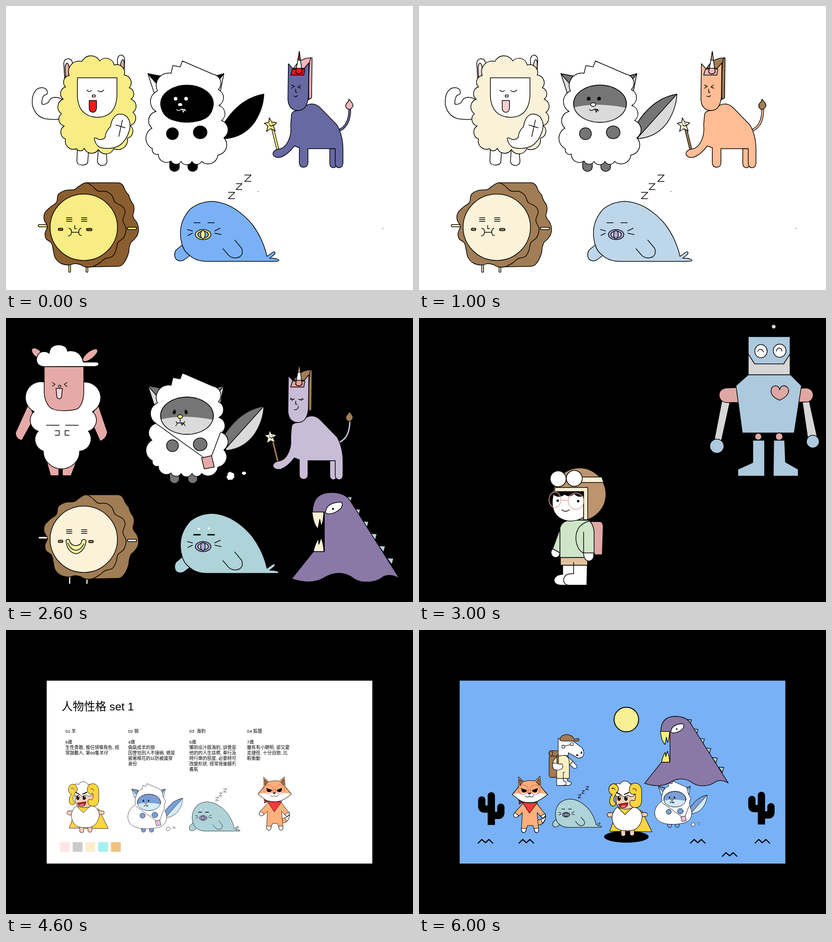
An HTML page that plays this animation: 895 px wide and 625 px high, repeating every 7 s.

```html
<!DOCTYPE html>
<html lang="zh-Hant">
<head>
<meta charset="utf-8">
<title>Character sheet</title>
<style>
html, body { margin: 0; width: 100%; height: 100%; overflow: hidden; background: #000; }
svg { display: block; width: 895px; height: 625px; }
.scene {
  stroke: #000; stroke-width: 1.5; stroke-linejoin: round; stroke-linecap: round;
  visibility: hidden;
  animation: show 7s step-end infinite;
  animation-delay: calc((var(--i) - 7) * 1s);
}
@keyframes show {
  0% { visibility: visible; }
  14.2857%, 100% { visibility: hidden; }
}
text {
  font-family: "Liberation Sans", Arial, "Noto Sans CJK TC", "Noto Sans CJK", sans-serif;
  font-size: 9.8px; stroke: none; fill: #000; white-space: pre;
}
</style>
</head>
<body>
<svg id="stage" viewBox="0 0 895 625"></svg>
<script>
const P = (d, fill = 'none', extra = '') => `<path d="${d}" fill="${fill}" ${extra}/>`;
const E = (x, y, rx, ry, fill = 'none', extra = '') =>
  `<ellipse cx="${x}" cy="${y}" rx="${rx}" ry="${ry}" fill="${fill}" ${extra}/>`;
const R = (x, y, w, h, fill, r = 0, extra = '') =>
  `<rect x="${x}" y="${y}" width="${w}" height="${h}" rx="${r}" fill="${fill}" ${extra}/>`;
const G = (body, extra) => `<g ${extra}>${body}</g>`;
const place = (body, x, y, s) => G(body, `transform="translate(${x} ${y}) scale(${s})"`);
const NS = 'stroke="none"';
const points = s => s.split(' ').map(p => p.split(',').map(Number));

// Scalloped outline: one arc between each pair of cusps.
const puff = s => points(s).map(([x, y], i, a) => {
  if (!i) return `M${x} ${y}`;
  const r = Math.hypot(x - a[i - 1][0], y - a[i - 1][1]) * .56;
  return `A${r} ${r} 0 0 1 ${x} ${y}`;
}).join('');

// Closed smooth curve through the points.
const smooth = s => {
  const a = points(s), n = a.length, at = i => a[(i + n) % n];
  return `M${a[0]}` + a.map((p, i) => {
    const o = at(i - 1), q = at(i + 1), r = at(i + 2);
    const c = k => [p[k] + (q[k] - o[k]) / 6, q[k] - (r[k] - p[k]) / 6];
    const [x1, x2] = c(0), [y1, y2] = c(1);
    return `C${x1} ${y1} ${x2} ${y2} ${q}`;
  }).join('') + 'z';
};

// Line with a black edge on both sides.
const tube = (d, fill, w) =>
  P(d, 'none', `stroke-width="${w}"`) +
  P(d, 'none', `stroke="${fill}" stroke-width="${w - 2.6}"`);

const alpaca = c =>
  P('M129 160L127 126Q128 116 137 116Q147 117 146 130L140 162', '#fff') +
  P('M131 162L130 134Q131 125 135 126Q139 128 139 140L137 162z', c.ear) +
  P('M246 140L245 118Q246 108 254 108Q261 110 261 120L259 154', '#fff') +
  P('M254 150L252 128Q254 118 257 118Q260 119 260 128L259 152z', c.ear) +
  P('M120 249Q102 251 85 248Q64 242 58 218Q56 196 66 185Q72 179 82 180Q91 182 91 190Q91 196 84 196Q78 203 79 216Q87 218 94 211Q96 203 106 201Q117 201 125 206', '#fff') +
  P('M157 310L156 342Q157 350 168 350Q180 350 180 341L182 312', '#fff') +
  P('M203 315L201 342Q203 351 212 351Q222 350 222 342L220 315', '#fff') +
  P(puff('139,153 167,122 206,121 238,130 260,152 271,180 275,205 279,234 273,263 267,291 237,314 203,316 172,313 155,314 131,293 128,264 122,237 126,205 131,178 139,153'), c.wool) +
  P('M157 158H244V198Q241 245 200 245Q160 243 157 200z', '#fff') +
  P('M178 185Q182 191 188 186M202 186Q208 192 215 185') +
  E(193, 198, 3.5, 2.5, '#fff') +
  P('M183 208H199V225Q198 234 191 234Q183 233 183 225z', c.tongue) +
  P('M194 291Q197 289 203 293Q212 296 218 289Q219 276 230 265Q232 247 244 239Q258 235 267 245Q277 258 270 278Q262 300 246 309Q225 317 206 311Q196 305 194 291z', '#fff') +
  P('M256 251L248 287M242 262L262 268');

const fluffy = puff('455,150 467,184 468,219 474,252 479,290 466,328 430,342 409,342 385,342 363,341 335,326 322,314 321,269 330,232 333,187 363,148') + 'L367 131 383 134 388 121z';
const round = 'M363 148L367 131 383 134 388 121 455 150Q468 165 466 182L482 212Q468 230 478 256Q492 285 482 312Q470 336 440 341Q390 352 345 343Q292 330 292 285Q296 245 332 225Q325 215 332 190Q338 158 363 148z';

const wolf = c =>
  P('M312 149L326 192 345 180 344 155z', c.ear) + P('M312 149L344 155 338 179z', c.dark) +
  P('M479 149L471 190 455 178 459 155z', c.ear) + P('M479 149L457 155 461 172z', c.dark) +
  P('M470 275Q506 205 567 194Q566 225 547 255Q522 290 479 292z', c.light) +
  P('M470 275Q506 205 567 194L479 292z', c.dark) +
  (c.torn ? P(smooth('478,256 487,263 485,272 489,281 483,286 484,294 472,294 472,262'), '#000') : '') +
  [360, 400].map(x => P(`M${x} 335V354a10.5 10 0 0 0 21 0V335z`, c.dark)).join('') +
  P(c.body || fluffy, '#fff') +
  E(398, 215, 58, 41, c.dark) +
  P('M341 223Q392 211 455 224Q450 256 398 256Q346 256 341 223z', c.light, NS) +
  (c.light == c.dark ? '' : E(398, 215, 58, 41)) +
  (c.sad
    ? P('M371 202Q364 209 370 211Q375 210 371 202zM395 202Q402 209 397 211Q391 210 395 202z', '#000') +
      P('M383 221V229M374 228Q379 233 373 237M376 231H391M393 228Q389 233 394 237M385 231l2 5 3-5') +
      P('M331 233L436 308M472 251L452 304') +
      P('M430 308L452 303 458 328 436 332z', c.pouch) +
      P(puff('487,346 488,341 497,340 502,347 500,353 494,356 486,353 487,346'), '#fff') +
      P(puff('519,339 523,338 528,340 527,344 521,345 519,339'), '#fff')
    : E(373, 204, 4, 4, c.ink, NS) + E(396, 204, 4, 4, c.ink, NS) +
      P('M375 228Q379 232 384 228Q388 225 392 230M387 228l3 6 2-7 3 4', 'none', `stroke="${c.ink}"`)) +
  E(383, 217, 5.5, 4, c.nose || '#fff') +
  E(366, 281, 13, 13, c.dark) + E(427, 278, 15, 14, c.dark);

const unicorn = c =>
  tube('M732 274Q756 264 756 227', c.body, 5.6) +
  P('M754 205Q766 217 762 222Q758 229 752 227Q744 222 749 214Q754 210 754 205z', c.mane) +
  tube('M586 268L598 317', c.stick, 6) +
  P('M579 246L584 255 595 257 588 264 592 275 582 270 573 276 576 264 568 258 578 256z', c.star) +
  P('M580 262Q584 267 588 261M579 259v.5M585 258v.5') +
  P('M712 314V346Q712 356 721 356Q728 354 727 346V314z', c.body) +
  P('M628 238Q631 230 642 230Q652 228 660 219Q676 210 691 224L728 262Q741 285 741 316V346Q740 356 732 356Q724 355 724 346V314H664V346Q663 355 654 355Q645 354 645 345V312L634 308Q620 327 604 333Q590 335 587 326Q587 318 598 315Q614 314 622 294Q628 280 626 262z', c.body) +
  P('M632 138Q646 113 673 114L672 202 662 208z', c.mane) + P('M670 115Q665 122 666 205') +
  P('M621 127L630 137H656L666 125 665 200Q662 230 642 230Q621 229 620 205z', c.body) +
  P('M630 139H657L655 152H626z', c.horn) +
  P('M645 100L637 146Q644 153 651 146z', '#fff') +
  P('M645 100L642 119H647.5zM638.5 137H650L651 146Q644 153 637 146z', c.horn) +
  P('M637 183V190H640') +
  (c.wink
    ? P('M626 176Q629 181 634 178M643 179Q648 181 652 177M627 179l-2 0M630 180l-1 2M649 180l1 2M652 179l2 0M634 202Q642 203 643 194')
    : P('M628 174L634 177 628 181M648 174L642 178 648 181M633 198Q637 202 641 197'));

const tart = c =>
  R(71, 481, 24, 5, c.limb, 2.5) + R(138, 560, 4, 26, c.limb, 2) + R(176, 566, 4, 20, c.limb, 2) +
  P('M175 389L248 389Q257 391 260 401Q263 409 270 416Q272 427 280 437Q284 447 279 460Q279 467 287 475Q295 491 289 504Q283 514 275 520Q270 530 270 542Q265 560 256 569Q251 573 244 573L188 574z', c.crust) +
  P(smooth('175,389 188,395 202,407 220,408 233,417 240,432 256,441 262,453 257,472 264,490 259,509 246,521 242,537 234,551 218,556 205,566 189,574 174,574 163,569 151,567 138,570 120,566 108,554 104,538 100,522 88,512 86,499 91,485 84,471 85,456 97,443 111,432 115,415 130,406 150,404 160,397'), c.crust) +
  E(171, 487, 74, 73, c.face) +
  P([466, 470, 474].map(y => `M133 ${y}H145M166 ${y}H178`).join('')) +
  R(115, 489, 10, 5, c.crust, 2.5) + R(c.smile ? 182 : 177, 489.5, c.smile ? 10 : 12, 5, c.crust, 2.5) +
  R(267, 487, 20, 5, c.limb, 2.5) +
  (c.smile
    ? P('M132 490Q134 486 139 488Q142 501 154 501Q166 500 167 489Q172 485 176 490Q174 513 155 519Q134 516 132 490z', c.smile) +
      P('M136 495Q142 511 154 511Q166 510 171 497')
    : P('M151 483V490H155M144 498H160M138 489Q145 491 144 498Q144 505 137 506M165 489Q159 492 160 498Q160 505 166 505'));

const zzz = [[489, 410, 14], [506, 391, 13], [525, 372, 14]]
  .map(([x, y, s]) => P(`M${x} ${y}h${s}l-${s} ${s}h${s}`)).join('');
const dot = (x, y) => R(x, y, 1.4, 1.4, '#000', 0, NS);

const seal = c =>
  P('M390 524L374 537Q368 546 373 556Q380 564 391 559L408 546z', c.body) +
  P('M387 524Q375 480 405 447Q425 431 452 430Q500 432 541 480Q565 512 574 551L588 541Q594 541 590 547L580 555Q598 555 600 560Q599 562 594 562L443 562Q418 562 404 549Q391 540 387 524z', c.body) +
  P('M503 515L518 533Q523 545 514 552Q500 558 490 549L477 534') +
  P('M413 477H427M444 477H458', 'none', c.brow ? 'stroke-width="2.8"' : '') +
  (c.brow ? E(424, 464, 2.3, 2.3, '#fff', NS) + E(446, 463, 2.3, 2.3, '#fff', NS) : '') +
  P('M399 492L410 495M400 505L410 500M459 495L471 489M459 500L473 503') +
  E(433.5, 503, 17, 11, c.ring) + E(433.5, 503, 11.5, 7.5, c.inner) + E(433, 503, 5, 9, c.ring);

const sheep = () => {
  const pink = '#e5aaa7';
  return E(68, 77, 14, 8, pink, 'transform="rotate(42 68 77)"') +
    E(185, 82, 20, 8, pink, 'transform="rotate(-38 185 82)"') +
    P('M51 186L21 252Q21 267 35 269L62 220zM201 186L223 251Q221 266 207 271L186 224z', pink) +
    P('M90 318L98 347H116V325zM124 325V347H143L154 318z', pink) +
    P('M171 141A34.6 34.6 0 0 1 190 206A25 25 0 0 1 181 249A27 27 0 0 1 162 293A40 39 0 0 1 82 293A27 27 0 0 1 71 249A25 25 0 0 1 62 206A34.6 34.6 0 0 1 84 141z', '#fff') +
    P('M84 107H171V165Q170 190 157 200Q145 204 128 204Q106 204 97 197Q85 185 84 165z', pink) +
    P('M84 107Q68 106 67 92Q69 74 84 74Q91 74 95 78Q96 60 116 59Q134 60 135 73Q163 68 170 97H199Q204 98 204 102Q203 106 196 106.5z', '#fff') +
    P('M102 142L108 146 102 150M134 142L128 146 134 151') + E(118, 150, 2.5, 2, '#fff') +
    P('M110 155H124L122 175Q117 181 112 175z', '#f3d3d1') +
    P('M89 236H117M131 236H159M108 248H117V258H108M139 248H130V258H139');
};

const monster = tooth => {
  let spikes = '';
  for (let i = 0; i < 6; i++) spikes += `M${746 + 18.3 * i} ${393 + 27 * i}l15 1-4 14z`;
  return P(spikes, '#aed3d8') +
    P('M674 428Q674 384 715 384Q745 384 757 402L865 573Q846 562 830 569Q815 582 788 581Q772 580 760 570Q730 552 697 573Q670 588 628 574L676 514H700V427z', '#8a78a6') +
    P('M673 427H699Q698 450 693 458L690 443 686 464Q677 455 674 435z', tooth) +
    P('M676 514Q680 495 687 486L688 498 693 483Q699 500 699 514z', tooth) +
    P('M703 426Q705 407 735 405Q743 407 737 418Q724 432 707 431Q702 430 703 426z', '#fff') +
    E(719, 420, 2.2, 2.2, '#000', NS);
};

const robot = () => {
  const blue = '#adc9de', gray = '#d6d6d6', pink = '#e0a8a5';
  return E(780, 19, 4, 4, gray, NS) +
    P('M666 182L684 184 665 270H649zM843 184L858 182 876 264 855 266z', gray) +
    P('M702 153L676 154Q660 156 660 170Q661 184 676 186H704zM836 155L852 154Q866 156 867 170Q865 184 852 185H832z', pink) +
    E(655, 282, 15.5, 15.5, blue) + E(866, 272, 14, 14, blue) +
    R(724, 41, 92, 84, blue) +
    P('M724 79L738 101H802L816 79V125H724z', gray) +
    E(752, 73, 13.5, 14.5, '#fff') + E(793, 72, 14, 14.5, '#fff') +
    P('M745 74Q746 68 752 69Q757 70 757 75M786 73Q787 66 792 66Q798 67 798 73') +
    P('M724 125H817L841 149 825 253H711L697 149z', blue) +
    P('M793 181Q774 173 774 160Q775 150 784 149Q792 150 793 158Q795 149 803 149Q813 151 813 161Q811 173 793 181z', pink) +
    E(746, 261, 7.5, 7.5, pink) + E(792, 261, 8, 8, pink) +
    P('M734 269H760V348H701V333L734 318zM780 269H804L806 317 834 333V348H779z', blue);
};

const kid = () => {
  const green = '#cfe5c8', pink = '#e0a8a5', cream = '#f8efd4';
  return P('M376 448H398Q405 449 405 460L403 521H382z', pink) +
    E(353, 388, 58, 58, '#bc946d') +
    P('M316 544H370L369 588H312Q297 587 297 576Q300 565 316 564z', '#fff') +
    P('M311 527H370L371 544H311z', '#e0c19b') +
    P('M340 538V563Q320 561 318 576Q318 586 328 588') +
    P('M310 464L294 508 310 517z', green) +
    P('M294 508L310 517Q309 528 298 527Q288 522 291 512z', '#fff') +
    P('M310 462Q314 447 332 445H372Q385 453 385 475V527H310z', green, NS) +
    R(370.5, 517, 16, 11, '#000', 0, NS) +
    P('M310 517V462Q314 447 332 445H372Q385 453 385 475V517M310 517V527H370') +
    P('M374 447Q345 455 345 485Q346 510 363 518M362 471V517') +
    P('M362 517H384Q386 534 373 535Q362 533 362 517z', '#fff') +
    P('M298 382H362V438Q350 447 331 447Q293 443 293 404Q294 390 298 382z', '#fff') +
    P('M297 389L300 381H361V391Q350 396 341 386Q332 396 320 388Q308 397 297 389z', '#000') +
    P('M299 373H371V444H362V382H298z', cream) +
    P('M356 350H402L406 362H356z', cream) +
    E(306, 354, 17.5, 17.5, '#fff') + E(341.5, 353, 17.5, 17.5, '#fff') +
    G(E(299, 400, 13, 17) + E(345, 403, 17, 18) + P('M312 401H329'), `stroke="${pink}"`) +
    E(305, 402, 2.7, 2.7, '#000', NS) + E(350, 403, 2.7, 2.7, '#000', NS) +
    P('M314 422Q322 429 331 422');
};

const ram = () => {
  const gold = '#ffd53f', skin = '#f9cdb4';
  return P('M152 400L139 436 225 437 204 394z', gold) +
    R(134, 398, 18, 9, skin, 4.5) + R(198, 398, 18, 8, skin, 4) +
    R(162, 425, 9, 21, skin, 4) + R(180, 425, 9, 20, skin, 4) +
    P(smooth('150,391 160,387 186,387 198,391 205,405 201,421 191,432 174,435 157,432 147,422 144,406'), '#fff') +
    P('M157 389H184L170 402z', gold) +
    P('M152 358H193V378Q190 391 172 391Q153 390 152 376z', skin) +
    P(puff('150,362 148,347 160,340 180,340 190,348 190,360 176,362 162,361 150,362'), '#fff') +
    P('M157 352Q156 340 147 339Q137 341 137 352Q138 360 144 361Q138 368 139 378Q142 387 149 384Q153 380 149 376Q146 374 148 366Q153 358 157 352zM143 349Q148 346 150 352', gold) +
    P('M179 350Q180 338 192 338Q204 340 204 355V375Q203 388 190 388Q179 386 180 376Q182 371 188 374Q193 372 191 360Q188 362 183 360Q178 356 179 350zM186 350Q192 347 193 354', gold) +
    P('M153 357L160 361M178 357L169 361', 'none', 'stroke-width="2"') +
    E(158, 369, 3.4, 5, '#000', NS) + E(172, 369, 3.4, 5, '#000', NS) +
    E(159, 366.5, 1.1, 1.5, '#fff', NS) + E(173, 366.5, 1.1, 1.5, '#fff', NS) +
    P('M157 381Q168 379 176 378Q175 389 166 388Q159 387 157 381z', '#c9202b') +
    P('M161 386Q167 381 173 385Q168 389 161 386z', '#f58b8b', NS);
};

const fox = () => {
  const fur = '#ffb07c';
  return P('M605 425Q622 426 624 407Q616 414 605 415z', fur) + P('M617 421Q623 416 624 407Q619 412 614 413z', '#fff') +
    P('M578 378L559 399Q554 406 560 409Q565 410 575 399L573 434Q573 441 578 441Q583 440 583 434L586 426H597L600 434Q600 441 605 441Q610 440 609 434L606 399 615 409Q622 411 624 404L604 378z', fur) +
    P('M559 399Q554 406 560 409Q565 409 567 405zM623 401Q624 409 617 410L613 406zM573 432Q573 441 578 441Q583 440 583 432zM600 432Q600 441 605 441Q610 440 609 432z', '#fff') +
    P('M567 324L578 334Q591 330 601 333L612 323 614 345 628 361 614 371Q603 378 591 378Q575 378 567 371L554 361 567 345z', fur) +
    P('M554 361Q578 356 590 358Q604 356 628 361L614 371Q603 378 591 378Q575 378 567 371z', '#fff', NS) +
    P('M569 329L576 335 570 342zM610 328L604 335 611 342z', '#a5714a') +
    P('M567 371L554 361 567 345M614 345L628 361 614 371Q603 378 591 378Q575 378 567 371') +
    G(E(577, 351, 10.5, 10) + E(602, 351, 10.5, 10) + P('M587 352H592'), 'stroke="#f0504f"') +
    P('M570 347L585 352Q583 357 578 357Q573 356 573 349zM609 347L595 352Q597 357 602 357Q607 355 607 348z', '#000', NS) +
    P('M587 358H593L590 361z', '#000') + P('M581 364Q587 369 590 364Q594 369 599 363') +
    P('M575 377Q591 380 607 377L590 400z', '#fb3a3c') +
    P('M575 377L567 373 569 377 568 381 573 379z', '#b3242c');
};

const horse = c =>
  R(142, 373, 20, 43, c.pack, 4) + R(142, 363, 20, 11, c.pack, 4) + E(145.5, 368.5, 3.5, 5.5, c.pack) +
  P('M157 416H178V423Q186 424 186 428Q185 432 179 432H157z', '#fff') +
  P('M170 418V423Q176 424 176 428Q175 432 170 432') +
  P('M182 390L189 384 197 393Q198 399 191 398z', '#fff') +
  P('M178 374L189 384 182 392z', c.shirt) +
  P('M149 390Q150 373 172 372Q182 374 182 388V418H157V390z', c.shirt) + P('M173 406H170V418') +
  P('M160 338L168 343H188L207 357Q213 366 209 374Q203 380 196 376L180 367V373Q170 371 160 374z', '#fff') +
  E(206, 367, 1.6, 2.4, '#000', NS) + E(197.5, 372, 2.4, 1.6, '#000', NS) +
  P('M173 354L184 351') + E(170, 355, 3, 3, '#fff') + E(187, 350, 3, 3, '#fff') +
  P('M163 342Q165 331 177 331Q189 332 191 340L200 339Q203 342 199 344L168 344z', c.pack) +
  R(157.5, 372, 3, 19, c.pack) +
  P('M149 388H158Q161 391 167 389Q171 393 168 398Q160 404 151 400Q148 395 149 388z', '#fff');

const cactus = x => G(
  P('M151 429V365a8 8 0 0 1 16 0V429z', '#000', NS) +
  P('M138 374V388Q138 394 144 394H159M180 390V402Q180 408 174 408H159', 'none', 'stroke-width="16"'),
  `transform="translate(${x} ${x ? -1 : 0})"`);
const zigzag = (x, y) => P(`M${x} ${y}l8-8 8 7 8-7 8 8`, 'none', 'stroke-width="2.4"');

const column = (x, lines) => lines.split('|').map((t, i) =>
  `<text x="${x}" y="${i ? 238 + 12 * i : 226}">${t}</text>`).join('');
const fill = color => R(0, 0, 895, 625, color, 0, NS);
const panel = color => fill('#000') + R(89.5, 111.5, 716, 402.5, color, 0, NS);

const brown = '#a17d55', cream = '#faf2d9', teal = '#aed3d8', lilac = '#b3a3da';
const blueWolf = wolf({ dark: '#7b9fd6', light: '#d3ebfb', ear: '#d3ebfb', sad: 1, nose: '#fff', pouch: '#e8bedc', body: round });
const tealSeal = seal({ body: teal, ring: lilac, inner: teal, brow: 1 });
const specks = dot(553.5, 407.5) + dot(828, 488.5);

const scenes = [
  fill('#fff') +
  alpaca({ wool: '#f8ec84', ear: '#dfa9a4', tongue: '#ff1a1a' }) +
  wolf({ dark: '#000', light: '#000', ear: '#fff', ink: '#fff' }) +
  unicorn({ body: '#6769a3', mane: '#fbb4b8', horn: '#ff1414', star: '#f8ec84', stick: '#f8ec84' }) +
  tart({ crust: '#8b5e30', face: '#f8ec84', limb: '#f8ec84' }) +
  seal({ body: '#7ab1f6', ring: '#f8ec84', inner: '#7ab1f6' }) + zzz + specks,

  fill('#fff') +
  alpaca({ wool: '#f9f2d8', ear: '#f8dcdc', tongue: '#f3d0d0' }) +
  wolf({ dark: '#757575', light: '#dadada', ear: '#dadada', ink: '#000' }) +
  unicorn({ body: '#ffbd95', mane: brown, horn: '#efbabb', star: '#f9f2d8', stick: brown }) +
  tart({ crust: brown, face: cream, limb: cream }) +
  seal({ body: '#bed6ea', ring: lilac, inner: '#bed6ea' }) + zzz + specks,

  fill('#000') + sheep() +
  wolf({ dark: '#757575', light: '#dadada', ear: '#dadada', sad: 1, torn: 1, nose: '#f8f08c', pouch: '#e5aaa7' }) +
  unicorn({ body: '#c9bcd6', mane: brown, horn: '#e5a09a', star: cream, stick: brown, wink: 1 }) +
  tart({ crust: brown, face: cream, limb: '#fff', smile: '#fbf7a0' }) +
  tealSeal + monster('#faf0d8'),

  fill('#000') + robot() + kid(),

  panel('#fff') +
  '<text x="122" y="177" style="font-size:24.7px">人物性格 set 1</text>' +
  column(130.5, '01 羊|6歲|生性勇敢, 擔任領導角色, 經|常鼓勵人, 第99隻羊仔') +
  column(268.5, '02 狼|4歲|偽裝成羊的狼|因害怕別人不接納, 總是|披著棉花的以防被識穿|身份') +
  column(403, '03  海豹|5歲|懶到出汁既海豹, 訓覺是|他的的人生目標, 奉行及|時行樂的態度, 必要時可|改變形狀, 經常拖後腿冇|義氣') +
  column(530, '04 狐狸|7歲|雖有有小聰明, 卻又愛|走捷徑, 十分自戀, 比|較衝動') +
  ['#fee6e6', '#cacaca', '#fbeecb', '#a5f0f0', '#f0c27e']
    .map((c, i) => R(118.5 + 28.1 * i, 467, 21.5, 21, c, 0, NS)).join('') +
  G(ram() + fox(), 'stroke-width=".8"') +
  place(blueWolf, 139.3, 284.8, .44) +
  place(tealSeal + zzz + dot(553.5, 407.5), 221.6, 167.7, .489),

  panel('#fff') +
  column(130.5, '05 DJ馬馬 (正)|33歲|學識淵搏, 四處旅行, 必要時|會教導動物們') +
  column(273, '06 消獸(貪食/邪惡)|未知歲數|是最喜歡吃掉單純的小|朋友和動物的怪獸喔') +
  G(horse({ shirt: '#ffbd8f', pack: '#a8764a' }), 'stroke-width=".8"') +
  place(monster('#faf0d0'), -39.9, 140.9, .495),

  panel('#a9cdf9') + R(90, 112, 715, 401.5, '#79b1f6', 0, NS) +
  E(456, 197, 27, 27, '#f9ef94', 'stroke-width="2"') +
  cactus(0) + cactus(594) +
  [[130, 469], [220, 469], [597, 469], [667, 498], [739, 469]].map(p => zigzag(...p)).join('') +
  E(456, 455, 49, 13, '#000', NS) +
  G(place(monster('#f9ef7c'), 8.7, -108, .776), 'stroke-width="1.7"') +
  G(place(horse({ shirt: '#fbeec3', pack: '#a07a52' }), 128.5, -137.4, 1.11) +
    place(fox(), -376.5, -17, 1.05) +
    place(ram(), 269.3, -28, 1.08), 'stroke-width="1"') +
  G(place(tealSeal + zzz, 118.9, 169, .472) +
    place(blueWolf, 395.5, 282, .42), 'stroke-width="2.2"')
];

document.getElementById('stage').innerHTML =
  scenes.map((s, i) => G(s, `class="scene" style="--i:${i}"`)).join('');
</script>
</body>
</html>
```
